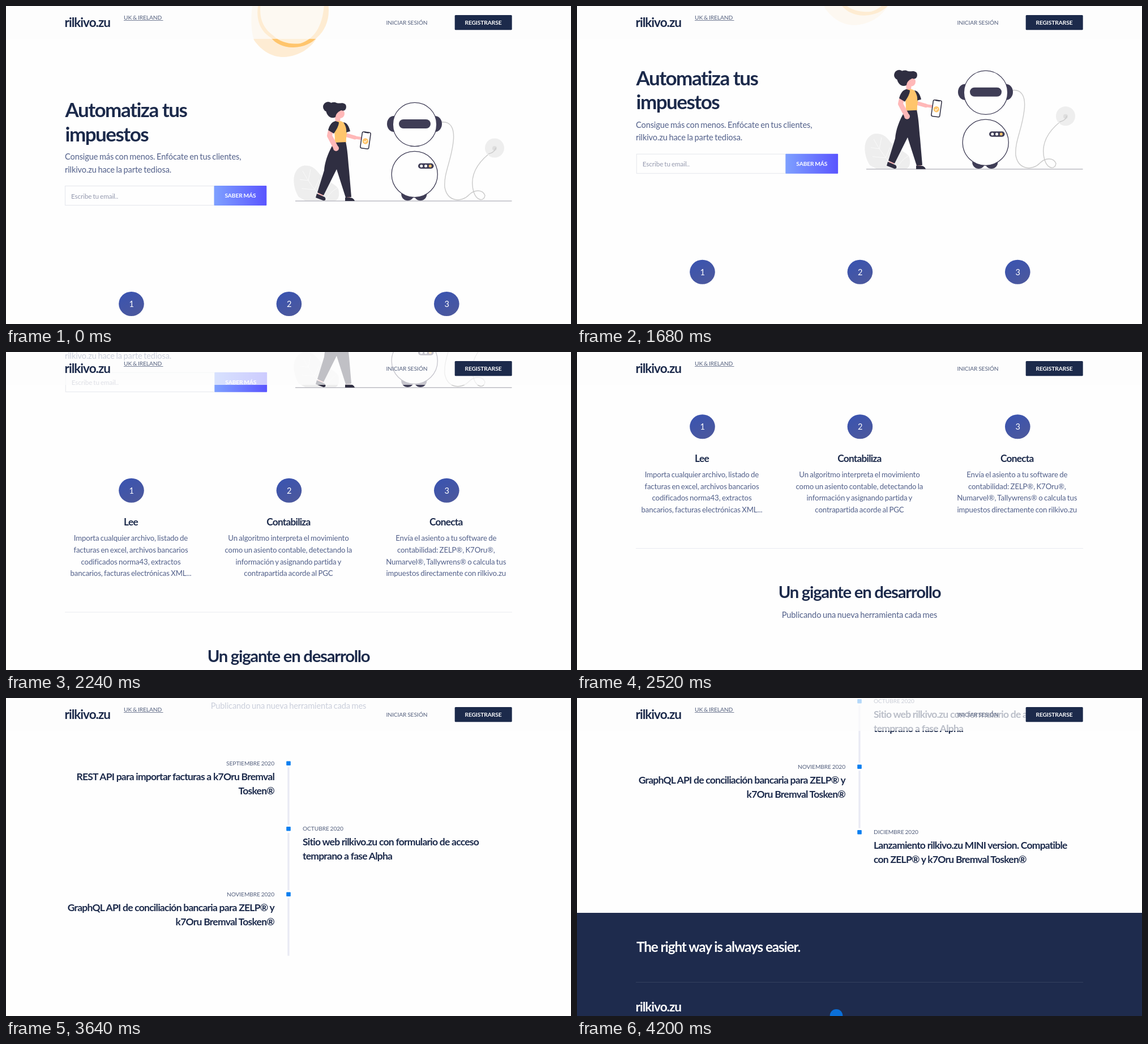
An HTML page that plays this animation: 998x561 px, repeating every 4.34 s.

```html
<!DOCTYPE html>
<html lang="es">
<head>
<meta charset="utf-8">
<title>Automatiza tus impuestos</title>
<style>
html, body { margin: 0; width: 100%; height: 100%; overflow: hidden; background: #fefefe; }
svg { display: block; width: 998px; height: 561px; }
text { font: 14.6px Lato, sans-serif; letter-spacing: -.008em; word-spacing: -.07em; fill: #52608a; }
.mid { text-anchor: middle; }
.end { text-anchor: end; }
.small { font-size: 10.2px; fill: #535f7d; }
.small.button { font-weight: 700; fill: #fff; }
.hint { font-size: 11.7px; fill: #9499ae; }
.body { font-size: 13.2px; }
.digit { fill: #fff; }
.title { font-weight: 700; letter-spacing: -.043em; word-spacing: 0; fill: #1c2a4b; }
.h1 { font-size: 35px; }
.h2 { font-size: 29.3px; }
.h3 { font-size: 17.5px; }
.h4 { font-size: 17.3px; }
.brand { font-size: 22.5px; }
.slogan { font-size: 24.2px; }
.light { fill: #fff; }
.dark { fill: #2f2e41; }
.metal { fill: #3f3d56; }
.skin { fill: #ffb8b8; }
.sun { fill: #ffc56c; }
.leaf { fill: #eeeeee; }
.outline { fill: #fefefe; stroke: #3f3d56; stroke-width: 1.3; }
.arm { fill: none; stroke: #ffb8b8; stroke-linecap: round; stroke-linejoin: round; }
.wire { fill: none; stroke: #cacaca; stroke-width: 1.4; }
.vein { fill: none; stroke: #fafafa; stroke-width: 1; }
</style>
</head>
<body>
<svg viewBox="0 0 998 561">
  <defs>
    <linearGradient id="cta"><stop stop-color="#7ea0ff"/><stop offset="1" stop-color="#5a55ff"/></linearGradient>
    <linearGradient id="ball" x2=".6" y2="1"><stop stop-color="#3853b2"/><stop offset="1" stop-color="#4b589e"/></linearGradient>
  </defs>
  <g id="page">
    <g id="blob">
      <path fill="#feecd3" d="M437-10C431 18 433 46 438 60C452 80 470 90 490 90C514 89 535 78 548 58L570-10Z"/>
      <path class="sun" d="M446-5C440 25 450 45 468 56C476 66 490 73 506 73C525 73 540 66 550 55C565 42 573 20 569-5Z"/>
      <path fill="#fef0d9" d="M450-5C446 22 455 40 472 52C484 65 505 68 520 66C545 58 560 35 562-5Z"/>
    </g>
    <g id="plants">
      <path class="leaf" d="M517 337C505 317 504 289 524 282C548 278 552 300 565 307C578 314 588 318 588 328C589 337 586 344 578 344H530Z"/>
      <path class="vein" d="M524 291Q538 318 562 343M519 306L534 308M522 322L544 324M538 288L534 308M553 306L545 324M585 321Q572 328 565 343"/>
    </g>
    <path fill="none" stroke="#bdbdc4" stroke-width="1.4" d="M511 344H893.500"/>
    <g id="woman">
      <path class="skin" d="M552 328l9 4-3 6-8-3zM600 335h8v5h-8zM581 192h10l-1 13-8 2z"/>
      <path class="dark" d="M549 331L563 337C566 341 564 344 560 343L547 338ZM599 338H607C612 338 615 341 616 344H599Z"/>
      <path class="dark" d="M580 240L600 239C604 258 604 272 606 290L610 337L600 338L584 288L561 334L550 329L562 290C563 275 569 258 580 240Z"/>
      <path class="arm" stroke-width="7" d="M602 228L616 232"/>
      <path class="arm" stroke-width="5" d="M614 231.500L630 234"/>
      <path class="sun" d="M581 205C588 200 599 203 602 215C603 225 600 233 601 240L580 241C583 230 577 216 581 205Z"/>
      <path class="arm" stroke-width="9" d="M573 222L571.500 229L582 249"/>
      <circle class="skin" cx="583" cy="251" r="5"/>
      <path class="dark" d="M582 203C574 205 571 212 569 219L579 225C584 218 588 211 588 205ZM596 205C603 206 606 213 608 221L601 223C602 216 599 210 596 205Z"/>
      <circle class="skin" cx="590" cy="190" r="8"/>
      <circle class="dark" cx="569" cy="178" r="9"/>
      <path class="dark" d="M565 183C566 172 578 167 584 171C590 173 594 169 600 174C603 181 598 187 592 184C586 187 583 190 582 196C574 200 566 194 565 183Z"/>
      <g transform="rotate(8 635 237)">
        <rect x="627.500" y="222.500" width="15" height="29" rx="2.500" fill="#fff" stroke="#2f2e41" stroke-width="1.500"/>
        <path class="dark" d="M631 222h8v2h-8z"/>
        <circle class="sun" cx="635" cy="238.500" r="5.200"/>
        <path d="M632.500 238.500l2 2 3-4" fill="none" stroke="#fff"/>
      </g>
    </g>
    <g id="robot">
      <path class="wire" d="M769 205C785 203 793 215 790 240C786 275 773 295 775 320C780 346 805 347 818 333C828 323 842 324 846 334C845 345 832 345 826 328C818 300 832 275 862 254"/>
      <circle class="leaf" cx="863" cy="250.500" r="17"/>
      <circle cx="863" cy="251" r="4" fill="#dedede"/>
      <path class="wire" d="M852 261Q864 258 865 250"/>
      <ellipse class="metal" cx="685" cy="208" rx="12" ry="14"/>
      <ellipse class="metal" cx="758" cy="208" rx="12" ry="14"/>
      <circle class="metal" cx="709.500" cy="332" r="11.300"/>
      <circle class="metal" cx="732" cy="332" r="11.300"/>
      <circle class="outline" cx="722" cy="209" r="38.700"/>
      <circle class="outline" cx="721.700" cy="297" r="40.600"/>
      <rect class="metal" x="694" y="200" width="56" height="16" rx="8"/>
      <rect class="metal" x="728" y="277.500" width="27.500" height="9.500" rx="4.700"/>
      <circle class="light" cx="733.800" cy="282.300" r="2.500"/>
      <circle class="light" cx="741.500" cy="282.300" r="2.500"/>
      <circle class="sun" cx="749.300" cy="282.300" r="2.500"/>
    </g>
  </g>
  <g id="header">
    <rect width="998" height="58" fill="#fefefe" opacity=".7"/>
    <rect x="792.700" y="16" width="101" height="26.300" rx="1.500" fill="#1c2a4b"/>
    <path d="M208 25.500H277.500" stroke="#535f7d" stroke-width=".8"/>
  </g>
</svg>
<script>
const STEP = 140, LOOP = 4340, FIRST_SCROLL = 11, SCROLL_STEP = 56.25, REVEAL_AT = 430;
const BRAND = 'rilkivo.zu';
const page = document.getElementById('page');
const header = document.getElementById('header');

const text = (x, y, str, cls = '') => `<text x="${x}" y="${y}" class="${cls}">${str}</text>`;
const lines = (x, y, gap, rows, cls) => rows.map((row, i) => text(x, y + i * gap, row, cls)).join('');
const rule = (y, color) => `<path d="M104 ${y}H894" stroke="${color}"/>`;
const reveal = (y, content) => `<g data-y="${y}">${content}</g>`;

const hero =
  lines(104.5, 196, 42.5, ['Automatiza tus', 'impuestos'], 'title h1') +
  lines(104, 271, 22.7, ['Consigue más con menos. Enfócate en tus clientes,', BRAND + ' hace la parte tediosa.']) +
  `<g id="form">
    <rect x="104.500" y="317.500" width="264" height="34" fill="#fefefe" stroke="#e4e6ec"/>
    <rect x="367.500" y="317" width="92.800" height="35" rx="1" fill="url(#cta)"/>
    ${text(115, 339.7, 'Escribe tu email..', 'hint')}
    ${text(414, 338.3, 'SABER MÁS', 'small button mid')}
  </g>`;

const features = [
  ['Lee', ['Importa cualquier archivo, listado de', 'facturas en excel, archivos bancarios',
    'codificados norma43, extractos', 'bancarios, facturas electrónicas XML...']],
  ['Contabiliza', ['Un algoritmo interpreta el movimiento', 'como un asiento contable, detectando la',
    'información y asignando partida y', 'contrapartida acorde al PGC']],
  ['Conecta', ['Envía el asiento a tu software de', 'contabilidad: ZELP®, K7Oru®,',
    'Numarvel®, Tallywrens® o calcula tus', 'impuestos directamente con ' + BRAND]],
].map(([name, rows], i) => {
  const x = 220.5 + i * 278.4;
  return `<ellipse cx="${x + 1}" cy="525.500" rx="22.300" ry="21.600" fill="url(#ball)"/>` +
    text(x + 1.3, 530.8, i + 1, 'digit mid') +
    reveal(581, text(x, 587.5, name, 'title h4 mid') + lines(x, 614.7, 20.55, rows, 'body mid'));
}).join('');

const growth = rule(740.25, '#e9ebf1') +
  text(499, 828, 'Un gigante en desarrollo', 'title h2 mid') +
  text(499, 863, 'Publicando una nueva herramienta cada mes', 'mid');

const timeline = [
  ['SEPTIEMBRE 2020', 'REST API para importar facturas a k7Oru Bremval', 'Tosken®'],
  ['OCTUBRE 2020', `Sitio web ${BRAND} con formulario de acceso`, 'temprano a fase Alpha'],
  ['NOVIEMBRE 2020', 'GraphQL API de conciliación bancaria para ZELP® y', 'k7Oru Bremval Tosken®'],
  ['DICIEMBRE 2020', `Lanzamiento ${BRAND} MINI version. Compatible`, 'con ZELP® y k7Oru Bremval Tosken®'],
].map(([date, ...rows], i) => {
  const y = 959 + i * 115.5;
  const [x, align] = i % 2 ? [524, ''] : [474, 'end'];
  const bar = i < 3 ? `<rect x="497.300" y="${y + 7}" width="3.300" height="101.500" fill="#e9eaf4"/>` : '';
  return bar + reveal(y,
    `<rect x="495.200" y="${y - 3.7}" width="7.600" height="7.400" rx="1" fill="#0a7ff0"/>` +
    text(x, y + 3.7, date, 'small ' + align) + lines(x, y + 29.5, 25, rows, 'title h3 ' + align));
}).join('');

const footer = '<rect y="1447.750" width="998" height="300" fill="#1e2b4d"/>' +
  text(105, 1517, 'The right way is always easier.', 'title slogan light') +
  rule(1570.25, '#34405f') +
  text(103.5, 1622, BRAND, 'title brand light') +
  '<circle cx="458" cy="1629" r="11.300" fill="#0a6fd8"/>';

page.innerHTML += hero + features + growth + timeline + footer;
header.innerHTML += text(103.5, 37, BRAND, 'title brand') +
  text(208, 24, 'UK &amp; IRELAND', 'small') +
  text(671.5, 33, 'INICIAR SESIÓN', 'small') +
  text(843, 33, 'REGISTRARSE', 'small button mid');

const form = document.getElementById('form');
const revealed = page.querySelectorAll('[data-y]');

function draw() {
  const tick = Math.floor(performance.now() % LOOP / STEP);
  const scroll = Math.max(0, tick - FIRST_SCROLL) * SCROLL_STEP;
  page.setAttribute('transform', `translate(0 ${-scroll})`);
  form.setAttribute('transform', `translate(${scroll ? 0.8 : 0} 0)`);
  for (const el of revealed) {
    el.setAttribute('visibility', el.dataset.y - scroll < REVEAL_AT ? 'visible' : 'hidden');
  }
  requestAnimationFrame(draw);
}
draw();
</script>
</body>
</html>
```
